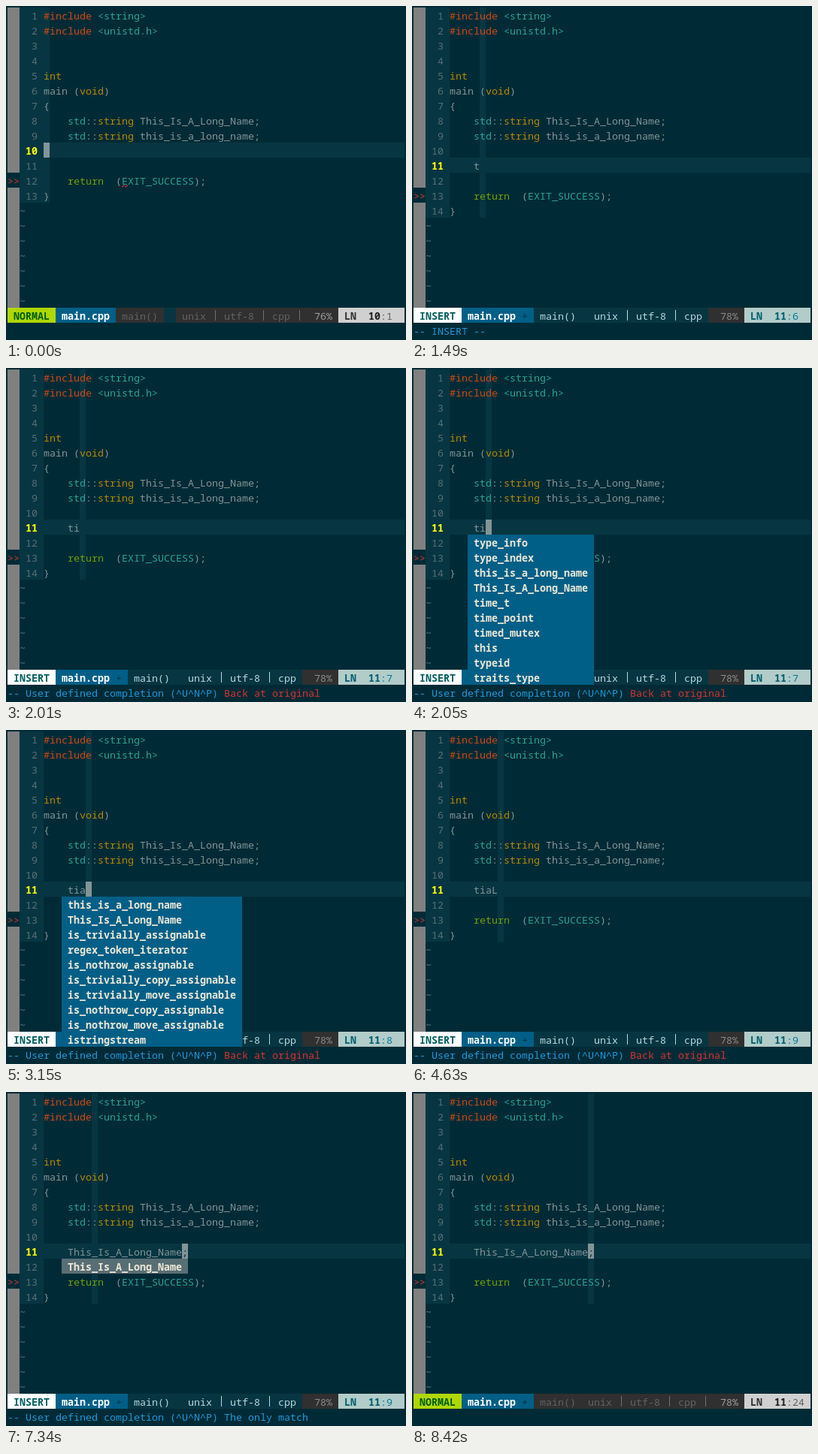
These frames come from a looping animation (532 px wide and 445 px high, 8780 ms). An HTML page with a canvas:

```html
<!DOCTYPE html>
<html lang="en">
<head>
<meta charset="utf-8">
<style>
html, body { margin: 0; width: 100%; height: 100%; overflow: hidden; background: #002b36; }
canvas { display: block; }
</style>
</head>
<body>
<canvas id="stage" width="532" height="445"></canvas>
<script>
const ctx = document.getElementById('stage').getContext('2d');
const LOOP = 8780, CW = 8, CH = 20, PAD = 2, CODE = 6;
const BG = '#002b36', SHADE = '#073642', FG = '#839496', DIM = '#586e75',
      BLUE = '#005f87', CREAM = '#eee8d5', GRAY = '#303030';
const ORANGE = '#cb4b16', CYAN = '#2aa198', YELLOW = '#b58900';
const SYNTAX = { '#include': ORANGE, int: YELLOW, void: YELLOW, string: YELLOW,
                 std: CYAN, EXIT_SUCCESS: CYAN, return: '#719e07' };
const TOKENS = /(#include|<.*?>|\b(?:int|void|std|string|return|EXIT_SUCCESS)\b)/;

const HEAD = ['#include <string>', '#include <unistd.h>', '', '', 'int', 'main (void)', '{',
  '    std::string This_Is_A_Long_Name;', '    std::string this_is_a_long_name;', ''];
const TAIL = ['', '    return  (EXIT_SUCCESS);', '}'];

const words = s => s.split(' ');
const MENU_T = { width: 25, bar: true, items: words('tm try tera this true throw tuple thread typeid typedef') };
const MENU_TI = { width: 21, items: words('type_info type_index this_is_a_long_name This_Is_A_Long_Name ' +
  'time_t time_point timed_mutex this typeid traits_type') };
const MENU_TIA = { width: 30, items: words('this_is_a_long_name This_Is_A_Long_Name is_trivially_assignable ' +
  'regex_token_iterator is_nothrow_assignable is_trivially_copy_assignable is_trivially_move_assignable ' +
  'is_nothrow_copy_assignable is_nothrow_move_assignable istringstream') };
const MENU_ONE = { width: 21, items: ['This_Is_A_Long_Name'] };
const MENU_PICKED = { ...MENU_ONE, picked: true };

// Each step keeps whatever it does not change. col: reported column, cur: block cursor.
const COMPLETION = '-- User defined completion (^U^N^P)', NAME = '    This_Is_A_Long_Name';
const typed = (text, col) => ({ text: '    ' + text, col, cur: -1, menu: null });
const steps = [
  [0, { open: false, insert: false, text: '', col: 0, cur: 0, menu: null, msg: '', extra: '', warn: false }],
  [400, { open: true, cur: -1 }],
  [480, { insert: true, col: 4, cur: 4, msg: '-- INSERT --' }],
  [1490, typed('t', 5)],
  [1530, { cur: 5, menu: MENU_T, msg: COMPLETION, extra: 'Back at original', warn: true }],
  [2010, typed('ti', 6)],
  [2050, { cur: 6, menu: MENU_TI }],
  [3110, typed('tia', 7)],
  [3150, { cur: 7, menu: MENU_TIA }],
  [4630, typed('tiaL', 8)],
  [4670, { cur: 8, menu: MENU_ONE }],
  [6480, { extra: '', warn: false }],
  [6520, { text: NAME, cur: 23, menu: MENU_PICKED, extra: 'The only match' }],
  [7340, { text: NAME + ';' }],
  [8340, { menu: null }],
  [8380, { col: 23, msg: '', extra: '' }],
  [8420, { insert: false }]
];

const X = col => PAD + col * CW, Y = row => PAD + row * CH;

function fill(row, col, w, color, h = 1) {
  ctx.fillStyle = color;
  ctx.fillRect(X(col), Y(row), w * CW, h * CH);
}

function put(row, col, text, color, bold) {
  ctx.font = (bold ? 'bold ' : '') + '13.3333px "Noto Sans Mono", "DejaVu Sans Mono", monospace';
  ctx.fillStyle = color;
  ctx.fillText(text, X(col), Y(row) + 16);
}

function putCode(row, line) {
  let col = CODE;
  for (const part of line.split(TOKENS)) {
    put(row, col, part, SYNTAX[part] || (part[0] === '<' ? CYAN : FG));
    col += part.length;
  }
}

function divider(col, color) {
  ctx.fillStyle = color;
  ctx.fillRect(X(col) + 4, Y(20) + 3, 1, 14);
}

function drawBuffer(s) {
  const lines = s.open ? [...HEAD, s.text, ...TAIL] : [...HEAD, ...TAIL];
  const n = lines.length, now = s.open ? 10 : 9;
  fill(0, 0, 2, '#808080', 20);
  fill(n - 2, 0, 2, BG);
  put(n - 2, 0, '>>', '#d0392b');
  fill(0, 2, 4, SHADE, n);
  fill(0, CODE + s.col, 1, SHADE, n);
  fill(now, CODE, 60, SHADE);
  lines.forEach((line, i) => {
    put(i, 2, String(i + 1).padStart(3), i === now ? '#ffff00' : DIM, i === now);
    putCode(i, line);
  });
  for (let row = n; row < 20; row++) put(row, 2, '~', '#657b83');
  if (!s.open) squiggle(n - 2, 19);
  if (s.cur >= 0) {
    fill(now, CODE + s.cur, 1, FG);
    put(now, CODE + s.cur, lines[now][s.cur] || '', BG);
  }
}

function squiggle(row, col) {
  ctx.strokeStyle = '#dc322f';
  ctx.beginPath();
  for (let i = 0; i <= 8; i++) ctx.lineTo(X(col) + i, Y(row) + 18 + Math.sin(i * Math.PI / 2) * 1.2);
  ctx.stroke();
}

function drawStatus(s) {
  const ins = s.insert, row = 20;
  const mid = ins ? SHADE : GRAY, text = ins ? '#b8d8e0' : '#626262', line = ins ? '#b8d8e0' : '#707070';
  const fn = s.open ? 20 : 18, right = ins ? 29 : 28;
  fill(row, 0, 66, SHADE);
  fill(row, 0, 8, ins ? '#ffffff' : '#afd700');
  put(row, 1, ins ? 'INSERT' : 'NORMAL', ins ? '#005f5f' : '#005f00', true);
  fill(row, 8, fn - 8, BLUE);
  put(row, 9, 'main.cpp', '#ffffff', true);
  if (s.open) put(row, 18, '+', '#00303e');
  fill(row, fn, 8, mid);
  put(row, fn + 1, 'main()', text);
  fill(row, right, 55 - right, mid);
  put(row, right + 1, 'unix', text);
  put(row, right + 8, 'utf-8', text);
  put(row, right + 16, 'cpp', text);
  divider(right + 6, line);
  divider(right + 14, line);
  if (ins) fill(row, 49, 6, GRAY);
  else divider(right + 20, line);
  put(row, 51, s.open ? '78%' : '76%', ins ? '#8a8a8a' : '#9e9e9e');
  fill(row, 55, 11, ins ? '#b2ccc9' : '#d0d0d0');
  put(row, 56, 'LN', ins ? '#005f6f' : '#303030', true);
  put(row, 60, s.open ? '11' : '10', ins ? '#005f6f' : '#202020', true);
  put(row, 62, ':' + (s.col + 1), ins ? '#007a9a' : '#606060');
}

function drawMenu({ width, items, bar, picked }) {
  fill(11, 9, width, picked ? DIM : BLUE, items.length);
  items.forEach((item, i) => put(11 + i, 10, item, CREAM, true));
  if (bar) {
    fill(11, 9 + width, 1, CREAM, 10);
    fill(11, 9 + width, 1, FG, 7);
  }
}

function draw(t) {
  const s = {};
  for (const [at, change] of steps) if (at <= t) Object.assign(s, change);
  ctx.fillStyle = BG;
  ctx.fillRect(0, 0, 532, 445);
  drawBuffer(s);
  drawStatus(s);
  put(21, 0, s.msg, '#1e98dc');
  put(21, 36, s.extra, s.warn ? '#dc322f' : '#1e98dc');
  if (s.menu) drawMenu(s.menu);
}

const start = performance.now();
function tick() {
  draw((performance.now() - start) % LOOP);
  requestAnimationFrame(tick);
}
tick();
</script>
</body>
</html>
```
